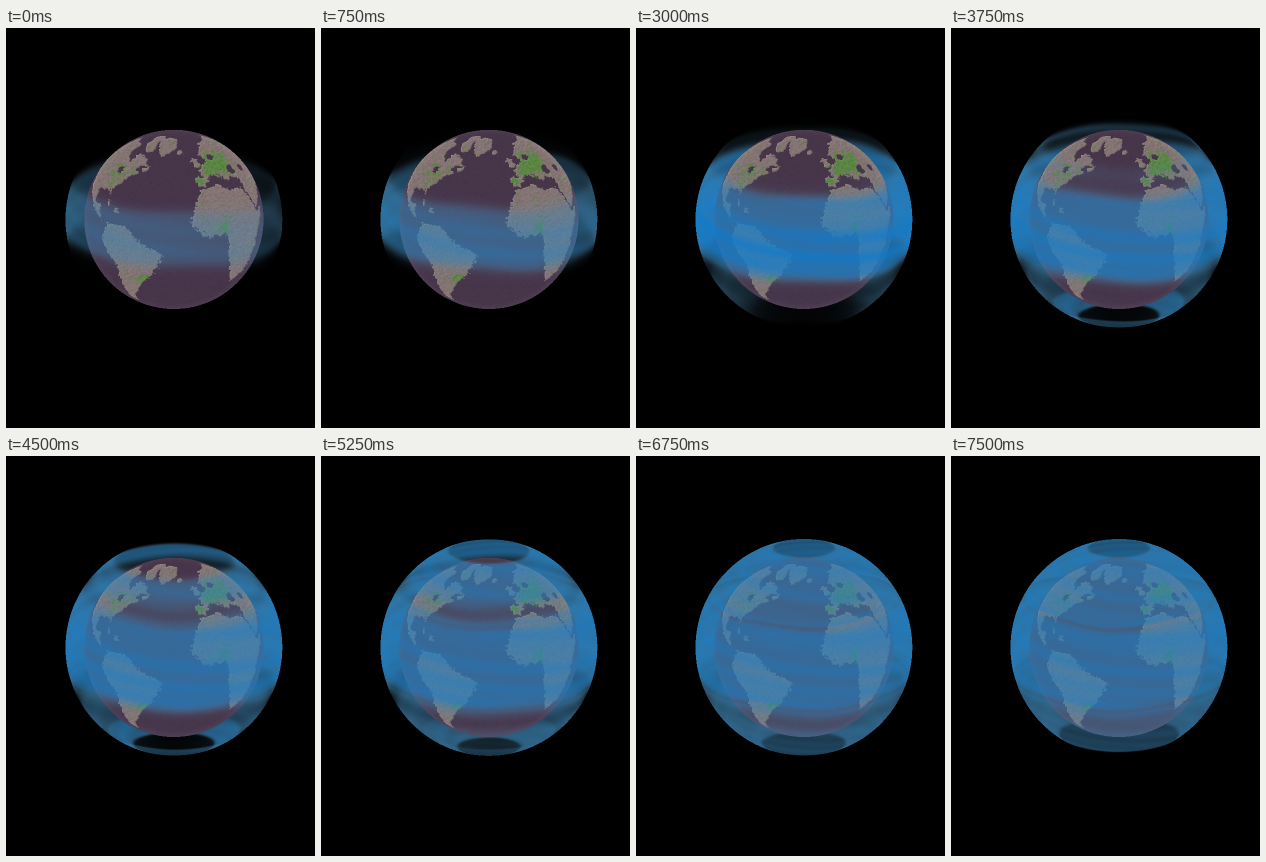
A matplotlib script that plays this animation: 309 px wide and 400 px high, repeating every 8 s.

```python
import numpy as np
import matplotlib.pyplot as plt
from matplotlib.animation import FuncAnimation
from matplotlib.path import Path

W, H, SS = 309, 400, 2
CX, CY, R_GLOBE, R_SHELL = 167.9, 191.4, 89.6, 108.4
LAT0, LON0 = np.radians(17), -28
STEPS, TICKS_PER_STEP = 11, 3
rng = np.random.default_rng(4)

# A few corners (lon, lat) per landmass; noise roughens the coast
NORTH_AMERICA = [
    (-130, 69), (-94, 67), (-93, 58), (-80, 52), (-77, 61), (-64, 59),
    (-56, 52), (-68, 49), (-61, 46), (-70, 42), (-76, 35), (-81, 31),
    (-80, 26), (-84, 30), (-97, 27), (-95, 18), (-88, 20), (-84, 10),
    (-78, 7), (-105, 20), (-130, 40)]
SOUTH_AMERICA = [
    (-77, 9), (-62, 10.5), (-50, 0), (-35, -6), (-39, -16), (-48, -27),
    (-58, -36), (-66, -46), (-69, -53), (-74, -50), (-70, -18), (-81, -4)]
AFRICA = [
    (-6, 35), (10, 37), (20, 31), (32, 31), (43, 11), (51, 12), (39, -6),
    (33, -27), (20, -34), (12, -17), (9, 4), (-8, 4.5), (-17, 14), (-10, 30)]
EURASIA = [
    (-9, 43), (-8, 37), (-1, 37), (4, 43), (10, 44), (17, 39), (13, 45),
    (22, 37), (27, 40), (36, 36), (35, 29), (43, 13), (57, 22), (80, 30),
    (80, 72), (25, 71), (5, 61), (11, 56), (2, 51), (-4, 48.5), (-1, 44)]
GREENLAND = [(-44, 60), (-24, 69), (-15, 81), (-40, 83), (-68, 78), (-53, 68)]
LANDS = [NORTH_AMERICA, SOUTH_AMERICA, AFRICA, EURASIA, GREENLAND]

# Round patches: lon, lat, radius in degrees
ISLANDS = [(-19, 65, 2), (-2, 53, 2.4), (-4, 57, 1.8), (-79, 22, 1.8),
           (-71, 19, 1.7), (-56, 49, 2.2), (-68, 66, 3.5), (-76, 71, 3.5),
           (-80, 79, 4)]
SEAS = [(33, 43.5, 3), (19, 57, 2.5), (50, 41, 3), (-84, 45, 2.5)]
FORESTS = [(-83, 41, 8), (12, 50, 11), (30, 54, 9), (-5, 40, 4), (6, 9, 6),
           (-52, -27, 6)]

OCEAN = np.array([71, 53, 74.])
LAND = np.array([132, 116, 115.])
GREEN = np.array([76, 140, 52.])
THIN = np.array([84, 140, 175.])
DENSE = np.array([12, 122, 205.])

px = (np.arange(W * SS) + .5) / SS
py = (np.arange(H * SS) + .5) / SS
X, Y = np.meshgrid(px - CX, CY - py)


def sphere(radius, side=1):
    """Longitude and latitude in degrees of each pixel, and the disc mask."""
    x, y = X / radius, Y / radius
    r2 = x * x + y * y
    z = side * np.sqrt(np.clip(1 - r2, 0, 1))
    s, c = np.sin(LAT0), np.cos(LAT0)
    lat = np.degrees(np.arcsin(np.clip(y * c + z * s, -1, 1)))
    lon = LON0 + np.degrees(np.arctan2(x, z * c - y * s))
    return lon, lat, r2 <= 1


def smooth(a, n):
    for _ in range(n):
        a = sum(np.roll(a, d, ax) for ax in (0, 1) for d in (-1, 0, 1)) / 6
    return a


def grain(n):
    g = smooth(rng.normal(size=X.shape), n)
    return g / g.std()


def blobs(spots, lon, lat):
    return sum(np.exp(-(((lon - a) * np.cos(np.radians(b))) ** 2
                        + (lat - b) ** 2) / r ** 2) for a, b, r in spots)


def inside(polys, lon, lat):
    pts = np.column_stack([lon.ravel(), lat.ravel()])
    hit = np.any([Path(p).contains_points(pts) for p in polys], axis=0)
    return hit.reshape(lon.shape)


def make_globe():
    lon, lat, disc = sphere(R_GLOBE)
    lo, la = lon + .8 * grain(5), lat + .5 * grain(5)
    land = inside(LANDS, lo, la) | (blobs(ISLANDS, lo, la) > .37)
    land = (land & (blobs(SEAS, lo, la) < .37)).astype(float)
    height = smooth(land, 2) * 1.5 + .12 * grain(5) * land
    relief = sum(np.roll(height, 1, ax) - np.roll(height, -1, ax)
                 for ax in (0, 1))
    wood = blobs(FORESTS, lon, lat) - .5 + .35 * grain(5)
    wood = np.clip(wood * 1.6, 0, .8) * land
    img = OCEAN + land[..., None] * (LAND - OCEAN)
    img = img + wood[..., None] * (GREEN - img)
    shade = grain(2) * (1 + 2 * land) - np.clip(relief, -1.5, 1.5) * 16 * land
    shade += np.clip(np.hypot(X, Y) / R_GLOBE - .94, 0, .06) * 120
    return np.clip(img + shade[..., None], 0, 255), disc


def ease(t, a, b):
    u = np.clip((t - a) / (b - a), 0, 1)
    return u * u * (3 - 2 * u)


def band(lat, lo, hi, soft):
    return (np.tanh((lat - lo) / soft) - np.tanh((lat - hi) / soft)) / 2


def bell(v, mid, width):
    return np.exp(-((v - mid) / width) ** 2)


def veil(t, lon, lat):
    """Opacity of the veil: a belt that spreads towards both poles."""
    lo, la = np.radians(lon), np.radians(lat)
    bend = 1.6 * np.sin(2 * lo + .5 + .2 * t) + np.sin(5 * lo + 1.7 * t)
    lat = lat + bend * np.cos(la) ** 2
    mid = np.clip(np.cos(lo - np.radians(LON0)), 0, 1)
    early = 1 - ease(t, 0, 2)

    bottom, top = -9 - 9 * ease(t, 0, 4), 20 + 9 * ease(t, 0, 3)
    belt = band(lat, bottom, top, 3) * (.44 + .28 * ease(t, 0, 3))
    belt = belt * (1 - .3 * early * (1 - np.cos(lo + 1.3)))
    belt = belt * (1 - .95 * early * bell(lon, 75, 32) * bell(lat, 5, 8))
    core = band(lat, -12, 11, 5) * .6 * bell(t, 3, 2.2)

    north = band(lat, top, 39 + 34 * ease(t, 4, 8), 4 - 3 * ease(t, 5, 7))
    north = north * .68 * ease(t, 0, 7) * (1 - .9 * mid * (1 - ease(t, 4, 6.5)))
    north = north * (1 - .6 * (1 - ease(t, 7, 10)) * bell(lat, 35, 6))

    pole = -54 - 14 * ease(t, 3.5, 5) - 10 * ease(t, 6, 8) + 21 * ease(t, 8, 10)
    south = band(lat, pole, bottom, 6 - 5 * ease(t, 4, 5))
    south = south * .48 * ease(t, 1, 6) * (1 - .9 * mid * (1 - ease(t, 6, 8)))
    south = south * (1 - .75 * (1 - ease(t, 7, 11)) * bell(lat, -27, 6))
    ring = band(lat, pole, -53, 1) * .4 * ease(t, 4, 5) * (1 - ease(t, 6, 8))

    a = 1 - (1 - belt) * (1 - core) * (1 - north) * (1 - south) * (1 - ring)
    streak = sum(np.sin(k * lo + 9 * k * la + k * k + .4 * t)
                 for k in range(1, 5)) / 4
    return np.clip(a * (1 + .13 * streak), 0, .97)


def cover(img, a):
    a = a[..., None]
    tint = THIN + (DENSE - THIN) * a ** 1.7
    return img * (1 - a) + tint * a


GLOBE, DISC = make_globe()
FRONT = sphere(R_SHELL)
BACK = sphere(R_SHELL, -1)


def render(step):
    shell = FRONT[2]
    img = cover(np.zeros(X.shape + (3,)), veil(step, *BACK[:2]) * shell)
    img = np.where(DISC[..., None], GLOBE, img)
    img = cover(img, veil(step, *FRONT[:2]) * shell)
    img = img.reshape(H, SS, W, SS, 3).mean((1, 3))
    return np.clip(img, 0, 255).astype(np.uint8)


PICTURES = [render(s) for s in range(STEPS)]

fig = plt.figure(figsize=(W / 100, H / 100), dpi=100, facecolor="black")
ax = fig.add_axes([0, 0, 1, 1])
ax.axis("off")
view = ax.imshow(PICTURES[0], interpolation="nearest", aspect="auto")


def update(i):
    view.set_data(PICTURES[i // TICKS_PER_STEP])
    return [view]


anim = FuncAnimation(fig, update, frames=32, interval=250, repeat=True,
                     repeat_delay=0, blit=False)
plt.show()
```
